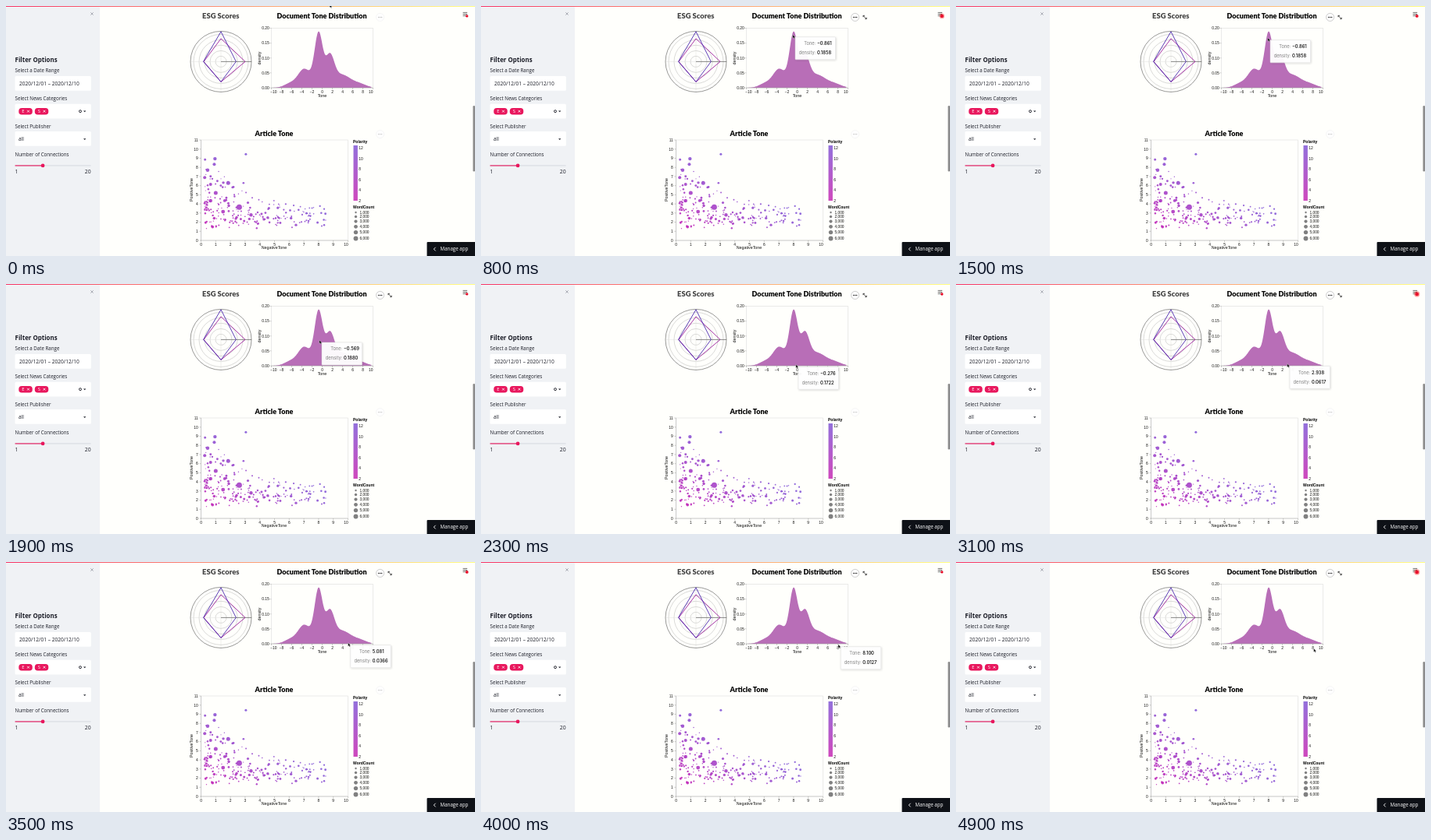
An HTML page that plays this animation: 600 by 321 pixels, repeating every 5000 ms.

```html
<!DOCTYPE html>
<html lang="en">
<head>
<meta charset="utf-8">
<title>Tone dashboard</title>
<style>
html, body { margin: 0; width: 100%; height: 100%; overflow: hidden; background: #fffffc; }
svg { display: block; width: 100vw; height: 100vh; }
text { font-family: "Open Sans", "Noto Sans", sans-serif; font-size: 6.2px; font-weight: 500; fill: #1c1e28; }
.head { font-family: Lato, sans-serif; font-weight: 900; font-size: 9px; fill: #000; }
.axis { font-family: "Liberation Sans", Arial, sans-serif; font-size: 4.9px; fill: #111; }
.legend { font-family: "Liberation Sans", Arial, sans-serif; font-size: 5px; font-weight: bold; fill: #000; }
.tip { font-family: Inter, sans-serif; font-size: 5.8px; fill: #000; }
.key { fill: #808080; font-weight: 400; }
</style>
</head>
<body>
<svg id="stage" viewBox="0 0 600 321" preserveAspectRatio="none">
  <defs>
    <linearGradient id="bar"><stop stop-color="#f63366"/><stop offset="1" stop-color="#fffd80"/></linearGradient>
    <linearGradient id="scale" x2="0" y2="1"><stop stop-color="#9370db"/><stop offset="1" stop-color="#cf48bd"/></linearGradient>
    <filter id="shadow" x="-20%" y="-20%" width="140%" height="150%">
      <feDropShadow dx="0.6" dy="0.8" stdDeviation="0.9" flood-opacity="0.18"/>
    </filter>
  </defs>
</svg>
<script>
const LOOP = 5000, STEP = 100;
const PINK = '#e8175d', GREY = '#ddd', INK = '#1c1e28';
const stage = document.getElementById('stage');

function add(tag, attrs, parent = stage) {
  const el = document.createElementNS('http://www.w3.org/2000/svg', tag);
  for (const k in attrs) el.setAttribute(k, attrs[k]);
  return parent.appendChild(el);
}
function label(str, x, y, cls = '', attrs = {}, parent = stage) {
  const el = add('text', { x, y, class: cls, ...attrs }, parent);
  el.textContent = str;
  return el;
}
const rect = (x, y, width, height, fill, attrs = {}, parent = stage) =>
  add('rect', { x, y, width, height, fill, ...attrs }, parent);
const dot = (cx, cy, r, fill, attrs = {}, parent = stage) =>
  add('circle', { cx, cy, r, fill, ...attrs }, parent);
const line = (d, stroke, w = 0.6, parent = stage) =>
  add('path', { d, stroke, 'stroke-width': w, fill: 'none' }, parent);
const MID = { 'text-anchor': 'middle' }, END = { 'text-anchor': 'end' };
const size = px => ({ style: `font-size:${px}px` });
const turned = (x, y) => ({ ...MID, ...size(5.3), transform: `translate(${x} ${y}) rotate(-90)` });
const minus = s => String(s).replace('-', '\u2212');

function drawSidebar() {
  rect(0, 0, 120, 321, '#f0f2f5');
  line('M108.3 8.3l3.4 3.4m0-3.4l-3.4 3.4', '#8a8d98', 0.7);
  label('Filter Options', 11.6, 72, '', { style: 'font-size:7.9px;font-weight:700' });
  label('Select a Date Range', 11.6, 85);
  label('Select News Categories', 11.6, 121.3);
  label('Select Publisher', 11.6, 156.8);
  label('Number of Connections', 11.6, 193);
  for (const y of [90, 125.7, 161]) rect(11.5, y, 97.3, 18.8, '#fff', { rx: 1.5 });
  label('2020/12/01 – 2020/12/10', 17, 101.6, '', size(6.6));
  label('all', 16, 172.8, '', size(6.6));

  [['E', 16.3], ['S', 36.8]].forEach(([s, x]) => {
    rect(x, 130.9, 17.5, 8.6, PINK, { rx: 3.8 });
    label(s, x + 4, 137.4, '', { style: 'font-size:6px;fill:#fff' });
    line(`M${x + 10.8} 133.8l2.8 2.8m0-2.8l-2.8 2.8`, '#fff', 0.8);
  });
  dot(95, 135.2, 1.5, 'none', { stroke: INK, 'stroke-width': 0.9 });
  for (const y of [134.4, 170.2]) add('path', { d: `M99 ${y}h3.4l-1.7 1.9z`, fill: INK });

  rect(11.6, 204.5, 97, 0.9, '#d3d6dd');
  rect(11.6, 204.4, 35.5, 1.1, PINK);
  dot(47.1, 204.9, 2.4, PINK);
  label('1', 11.6, 215.2, '', size(6.8));
  label('20', 108.6, 215.2, '', { ...END, ...size(6.8) });
}

function drawRadar() {
  label('ESG Scores', 274.8, 16, 'head', { ...MID, style: 'font-size:9.4px;fill:#444' });
  const cx = 275, cy = 71.4, R = 39;
  for (let i = 1; i <= 5; i++)
    dot(cx, cy, i * 7, 'none', { stroke: '#b4b4b4', 'stroke-width': 0.5 });
  line(`M${cx - R} ${cy}h${2 * R}M${cx} ${cy - R}v${2 * R}`, '#ddd', 0.5);
  dot(cx, cy, R, 'none', { stroke: '#555', 'stroke-width': 0.6 });
  line(`M${cx} ${cy}h${R}`, '#444', 0.6);
  const kite = (up, right, down, left, color) =>
    line(`M${cx} ${cy - up}L${cx + right} ${cy}L${cx} ${cy + down}L${cx - left} ${cy}Z`, color, 0.9);
  kite(29.5, 31, 26, 22, '#9c1f9c');
  kite(38.5, 19.3, 26, 22.5, '#4a28ae');
}

// Density of tone as a sum of bells: centre, spread, height
const BELLS = [
  [-6.3, 1.2, 0.014], [-3.5, 1.25, 0.063], [-0.7, 0.8, 0.1785],
  [1.5, 0.85, 0.092], [3.8, 1.9, 0.044], [7.6, 1.3, 0.01]
];
const density = t =>
  BELLS.reduce((sum, [m, s, h]) => sum + h * Math.exp(-(((t - m) / s) ** 2) / 2), 0);
const BASE = 105;
const toneX = t => 404.5 + 6.5 * t, toneAt = x => (x - 404.5) / 6.5;
const densityY = d => BASE - 382 * d;

function drawDensity() {
  label('Document Tone Distribution', 404, 16, 'head', MID);
  rect(339.5, 28.5, 130, 76.5, 'none', { stroke: GREY, 'stroke-width': 0.6 });
  let d = `M${toneX(-10)} ${BASE}`;
  for (let t = -10; t <= 9.7; t += 0.0974) d += `L${toneX(t).toFixed(2)} ${densityY(density(t)).toFixed(2)}`;
  add('path', { d: d + `V${BASE}Z`, fill: '#b86eb7' });
  line(`M339.5 ${BASE}h130`, '#999', 0.5);
  for (let v = 0; v <= 4; v++) {
    const y = densityY(v * 0.05);
    label((v * 0.05).toFixed(2), 336.8, y + 1.7, 'axis', END);
    line(`M337.4 ${y}h2`, '#999', 0.5);
  }
  for (let t = -10; t <= 10; t += 2) {
    label(minus(t), toneX(t) - (Math.abs(t) === 10 ? 0.28 * t : 0), 111.9, 'axis', MID);
    line(`M${toneX(t)} ${BASE}v2`, '#999', 0.5);
  }
  label('Tone', 404.5, 117.3, 'axis', { ...MID, ...size(5.4) });
  label('density', 0, 0, 'axis', turned(326, 67));
}

function seeded(s) {
  return () => {
    s = (s + 0x6d2b79f5) | 0;
    let v = Math.imul(s ^ (s >>> 15), 1 | s);
    v = (v + Math.imul(v ^ (v >>> 7), 61 | v)) ^ v;
    return ((v ^ (v >>> 14)) >>> 0) / 2 ** 32;
  };
}
const negX = n => 249.5 + 18.8 * n, posY = p => 301 - 11.72 * p;

// The largest articles: negative tone, positive tone, radius
const LARGE = [
  [2.6, 3.65, 3.5], [1.85, 6.3, 2.5], [1, 5.2, 2.5], [1.5, 3.15, 2.4], [0.65, 4.35, 2.3],
  [0.45, 7.7, 2.2], [0.95, 8.95, 2.2], [3.4, 2.8, 2.2], [0.9, 8.35, 2], [0.25, 6.9, 2],
  [0.65, 6.15, 2], [3.05, 9.45, 1.5]
];

function drawScatter() {
  label('Article Tone', 343, 166.6, 'head', MID);
  rect(249.5, 172, 188, 129, 'none', { stroke: GREY, 'stroke-width': 0.6 });
  line('M249.5 172V301H437.5', '#aaa', 0.5);
  for (let i = 0; i <= 11; i++) {
    label(i, 245.8, posY(i) + 1.7, 'axis', END);
    line(`M247.4 ${posY(i)}h2`, '#999', 0.5);
    if (i > 10) continue;
    label(i, negX(i) - (i === 10 ? 2.6 : 0), 307.8, 'axis', MID);
    line(`M${negX(i)} 301v2`, '#999', 0.5);
  }
  label('NegativeTone', 343, 312.4, 'axis', { ...MID, ...size(5.3) });
  label('PositiveTone', 0, 0, 'axis', turned(239, 236));

  const mix = (a, b, u) => Math.round(a + (b - a) * u);
  const mark = (n, p, r) => {
    const u = Math.min(1, Math.max(0, (n + p - 2) / 9));
    const fill = `rgb(${mix(192, 130, u)},${mix(35, 85, u)},${mix(182, 214, u)})`;
    dot(negX(n), posY(p), r, fill, { 'fill-opacity': 0.88 });
  };
  const rnd = seeded(29);
  for (let i = 0; i < 230; i++) {
    const n = 0.25 + 8.4 * rnd() ** 1.7;
    const p = 1.3 + 1.5 * rnd() + rnd() ** 2 * (6.6 * Math.exp(-n / 3) + 1.1);
    mark(n, p, 0.55 + 0.6 * rnd() + 0.8 * rnd() ** 4);
  }
  LARGE.forEach(m => mark(...m));

  label('Polarity', 444, 176, 'legend');
  rect(444.5, 179, 5.4, 71, 'url(#scale)');
  for (let v = 2; v <= 12; v += 2) label(v, 451.3, 252 - (v - 2) * 6.8, 'axis');
  label('WordCount', 444, 259.8, 'legend');
  for (let k = 0; k < 6; k++) {
    const y = 265 + 5.2 * k + 0.3 * k * k;
    dot(447.5, y, 1.2 * Math.sqrt(k + 1), '#808080');
    label(`${k + 1},000`, 452.5, y + 1.7, 'axis', size(4.8));
  }
}

function menuButton(x, y, edge, ink) {
  const g = add('g', {});
  dot(x, y, 5, '#fff', { stroke: edge, 'stroke-width': 0.6 }, g);
  for (const dx of [-2, 0, 2]) dot(x + dx, y, 0.7, ink, {}, g);
  return g;
}

function drawChrome() {
  rect(0, 0, 600, 1, 'url(#bar)');
  rect(597.4, 128, 2.6, 84.5, '#8c8c8c', { rx: 1.3 });
  line('M584.5 8.4h5.6m-5.6 2.1h5.6m-5.6 2.1h5.6', '#444', 0.8);
  rect(538.5, 303, 64, 20, '#0e1117', { rx: 1 });
  line('M549.6 309.8l-2.3 2.3l2.3 2.3', '#fff', 0.9);
  label('Manage app', 555.6, 314.2, '', { style: 'fill:#fff' });
}

rect(0, 0, 600, 321, '#fffffc');
drawSidebar();
drawRadar();
drawDensity();
drawScatter();
drawChrome();
menuButton(478.6, 164.6, '#eee', '#bbb');
const idle = menuButton(478.6, 14.4, '#eee', '#bbb');
const active = menuButton(478.6, 14.4, '#aaa', '#111');
line('M489 12.5l4 4M489 14.2v-1.9h1.9M493.2 14.7v1.9h-1.9', '#222', 0.8, active);
const halo = dot(589.7, 12.9, 2, '#f22');
const core = dot(589.7, 12.9, 1.7, '#e8112d');

const tip = add('g', {});
rect(0, 0, 51.6, 29, '#fff', { 'fill-opacity': 0.95, stroke: '#d8d8d8', 'stroke-width': 0.5, rx: 0.8, filter: 'url(#shadow)' }, tip);
label('Tone:', 26.4, 10.4, 'tip key', END, tip);
label('density:', 26.4, 22.3, 'tip key', END, tip);
const toneText = label('', 28, 10.4, 'tip', {}, tip);
const densityText = label('', 28, 22.3, 'tip', {}, tip);
const pointer = add('path', {
  d: 'M0 0V4.6L1.1 3.7L1.9 5.3L2.7 4.9L2 3.4H3.4Z',
  fill: '#000', stroke: '#fff', 'stroke-width': 0.35
});

// Pointer path: time, x, y
const PATH = [
  [0, 414, -2.6], [600, 398.8, 36.8], [1300, 398.8, 36.8], [1500, 398.8, 40.8],
  [2300, 402.8, 103.3], [3100, 423.7, 102.3], [4000, 457, 105.8],
  [4500, 457, 105.8], [4700, 457.6, 111], [LOOP, 457.6, 111]
];
function pointerAt(t) {
  const i = PATH.findIndex(([end]) => end > t);
  const [t0, x0, y0] = PATH[i - 1], [t1, x1, y1] = PATH[i];
  let u = (t - t0) / (t1 - t0);
  u = u * u * (3 - 2 * u);
  return [x0 + (x1 - x0) * u, y0 + (y1 - y0) * u];
}

// Readings snap to the sampling grid of the density estimate
const GRID = 0.0974, ORIGIN = -0.2763;

function draw(t) {
  const [x, y] = pointerAt(t);
  pointer.setAttribute('transform', `translate(${x} ${y})`);

  const hover = y > 4;
  idle.style.display = hover ? 'none' : '';
  active.style.display = hover ? '' : 'none';

  const inside = y > densityY(density(toneAt(x))) && y < 106.4;
  tip.style.display = inside ? '' : 'none';
  if (inside) {
    const tone = ORIGIN + GRID * Math.round((toneAt(x) - ORIGIN) / GRID);
    tip.setAttribute('transform', `translate(${x + 3.2} ${y + 3})`);
    toneText.textContent = minus(tone.toFixed(3));
    densityText.textContent = density(tone).toFixed(4);
  }

  const pulse = Math.sin(Math.PI * (t % 2000) / 2000) ** 4;
  halo.setAttribute('r', 1.7 + 2 * pulse);
  halo.setAttribute('fill-opacity', 0.45 * pulse);
  core.setAttribute('r', 1.7 + 0.6 * pulse);
}

const start = performance.now();
function tick() {
  const t = Math.max(0, performance.now() - start) % LOOP;
  draw(Math.floor(t / STEP) * STEP);
  requestAnimationFrame(tick);
}
tick();
</script>
</body>
</html>
```
